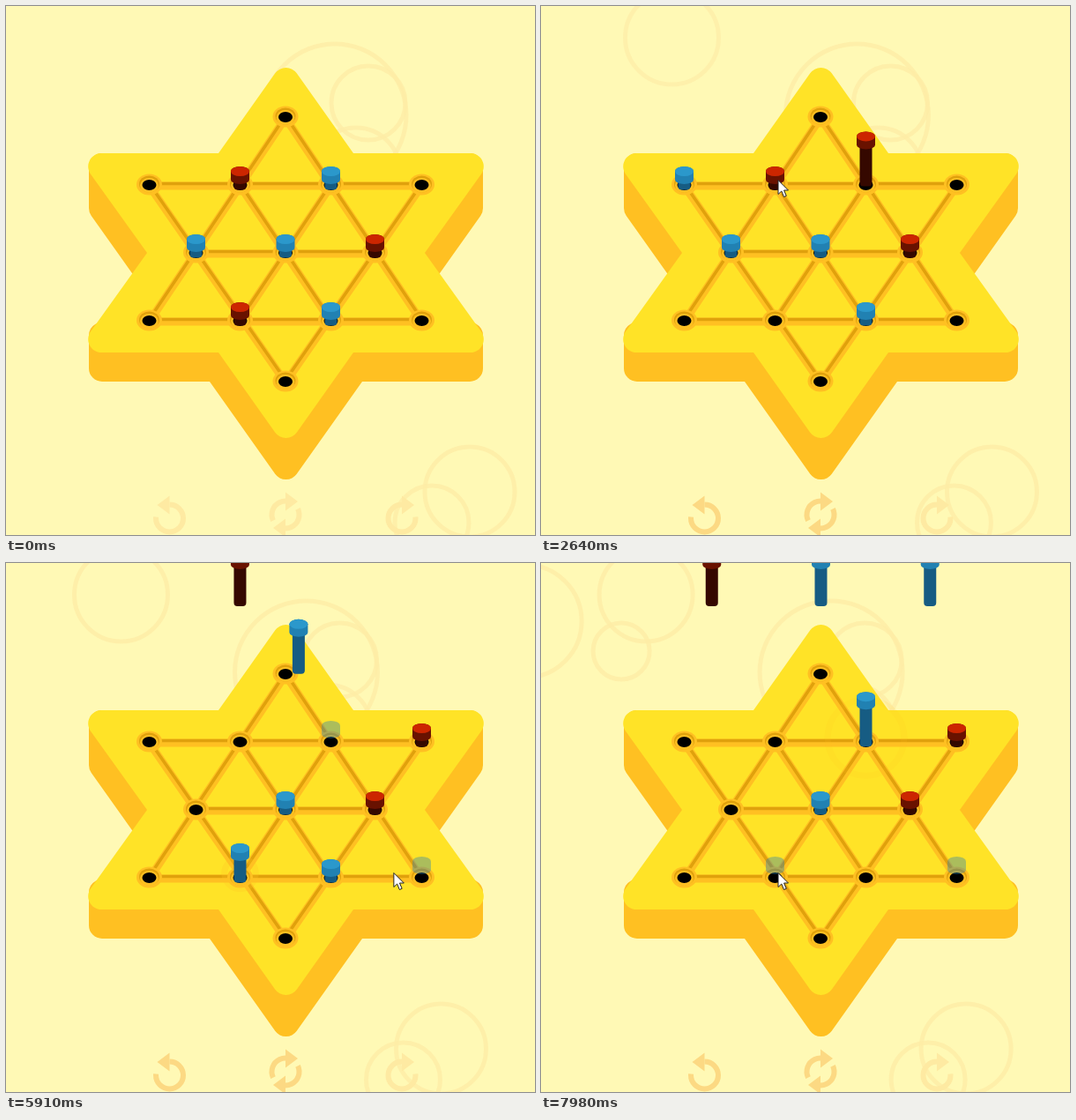
An HTML page with a canvas for the animation above (8 s loop, 600 by 600 pixels).

```html
<!DOCTYPE html>
<html lang="en">
<head>
<meta charset="utf-8">
<title>Star peg puzzle</title>
<style>
html, body { margin: 0; height: 100%; overflow: hidden; background: #fff9b5; }
canvas { display: block; width: 100vw; height: 100vh; }
</style>
</head>
<body>
<canvas id="stage" width="600" height="600"></canvas>
<script>
const ctx = document.getElementById('stage').getContext('2d');
const LOOP = 8000, RISE = 220, FLIGHT = 385, TRAVEL = 160, CLICK_LEAD = 150;
const LIFT = 64, HOLD = 18, STEM = 62;
const TO_TOP = RISE * (1 - HOLD / LIFT);
const CENTER_X = 317, CENTER_Y = 280;
const PAPER = '#fff9b5', BOARD = '#ffe327', ORANGE = '#ffc022', GROOVE = '#e0a10c';

const clamp = v => Math.max(0, Math.min(1, v));
const lerp = (a, b, k) => a + (b - a) * k;
const smooth = k => k * k * (3 - 2 * k);

// Holes are named by row letter and place in the row.
const holes = {};
for (const [row, count, y] of [['A', 1, 126], ['B', 4, 203], ['C', 3, 280], ['D', 4, 357], ['E', 1, 426]]) {
  for (let i = 0; i < count; i++) {
    const spacing = 97 + 1.5 * count;
    holes[row + (i + 1)] = [CENTER_X + spacing * (i - (count - 1) / 2), y];
  }
}
const grooves = ['B1 B4', 'C1 C3', 'D1 D4', 'A1 D1', 'A1 D4', 'E1 B1', 'E1 B4', 'B2 D3', 'B3 D2']
  .map(pair => pair.split(' ').map(name => holes[name]));

const colors = {
  red: { top: '#cc2600', side: '#691200', stem: '#350800' },
  blue: { top: '#2b98cb', side: '#2181b2', stem: '#165c83' }
};
const pegs = { B2: 'red', B3: 'blue', C1: 'blue', C2: 'blue', C3: 'red', D2: 'red', D3: 'blue' };

// Pegs are known by their first hole; each is chosen at `select` and leaves at `go`.
const moves = [
  { peg: 'B3', from: 'B3', to: 'B1', select: 600, go: 1146, hints: 'B1 D4' },
  { peg: 'D2', from: 'D2', to: 'B3', select: 1700, go: 2014, hints: 'B3 D4' },
  { peg: 'B2', from: 'B2', to: 'B4', select: 2750, go: 3492, hints: 'B4 D1', eats: 'D2' },
  { peg: 'B3', from: 'B1', to: 'D2', select: 4300, go: 4685, hints: 'D2', eats: 'C1' },
  { peg: 'B3', from: 'D2', to: 'D4', select: 5793, go: 6477, hints: 'B3 D4', eats: 'D3' },
  { peg: 'B3', from: 'D4', to: 'B3', select: 7100, go: 7341, hints: 'B3' },
  { peg: 'B3', from: 'B3', to: 'D2', select: 7600, go: Infinity, hints: 'D2 D4' }
];
const captures = moves.filter(m => m.eats)
  .map(m => ({ peg: m.eats, start: m.go + TO_TOP + FLIGHT + RISE }));
const clicks = moves.flatMap(m => [[m.select, m.from], [m.go - CLICK_LEAD, m.to]]);
const HOVER = [6900, 'B3'], ENTER = [150, 'C2'];
const stops = [ENTER, ...clicks, HOVER].sort((a, b) => (a[0] < b[0] ? -1 : 1));

function ellipse(x, y, rx, ry, fill) {
  ctx.fillStyle = fill;
  ctx.beginPath();
  ctx.ellipse(x, y, rx, ry, 0, 0, Math.PI * 2);
  ctx.fill();
}

function ring(x, y, r, width, color) {
  ctx.strokeStyle = color;
  ctx.lineWidth = width;
  ctx.beginPath();
  ctx.arc(x, y, r, 0, Math.PI * 2);
  ctx.stroke();
}

// Fills a clockwise polygon around the board centre, rounding its outward corners.
function roundedShape(points, fill) {
  const n = points.length;
  ctx.save();
  ctx.translate(CENTER_X + 0.5, CENTER_Y);
  ctx.beginPath();
  points.forEach((p, i) => {
    const a = points[(i + n - 1) % n], b = points[(i + 1) % n];
    const turn = (p[0] - a[0]) * (b[1] - p[1]) - (p[1] - a[1]) * (b[0] - p[0]);
    if (!i) ctx.moveTo((a[0] + p[0]) / 2, (a[1] + p[1]) / 2);
    ctx.arcTo(...p, ...b, turn > 0 ? 15 : 0);
  });
  ctx.fillStyle = fill;
  ctx.fill();
  ctx.restore();
}

const mirrorX = points => [...points, ...points.map(([x, y]) => [-x, y]).reverse()];
const mirrorY = points => [...points, ...points.map(([x, y]) => [x, -y]).reverse()];
const halfStar = mirrorY([[0, -221], [76.5, -113], [238.5, -113], [157.5, 0]]);
const unique = points => points.filter((p, i) => {
  const q = points[(i + 1) % points.length];
  return p[0] !== q[0] || p[1] !== q[1] && true;
});
const sameSpot = (p, q) => Math.abs(p[0] - q[0]) + Math.abs(p[1] - q[1]) === 0;
const distinct = points => points.filter((p, i) => !sameSpot(p, points[(i + 1) % points.length]));
const topFace = distinct(mirrorX(halfStar));
const sideFace = distinct(mirrorX(
  [[223.5, -113], [223.5, -46], [157.5, 47], [223.5, 85], [223.5, 146], [86.5, 146], [0, 268]]));

function drawBackground(t) {
  ctx.fillStyle = PAPER;
  ctx.fillRect(0, 0, 600, 600);
  const bubble = (x, y, r, born = -1000) => {
    ctx.globalAlpha = 0.75 * clamp((t - born) / 900);
    ring(x - 0.0055 * t, y, r, 5, '#feeca6');
  };
  bubble(373, 124, 81);
  bubble(411, 110, 42);
  bubble(397, 188, 50);
  bubble(526, 551, 51);
  bubble(483, 586, 42);
  bubble(163, 36, 53, 1900);
  bubble(26, 66, 64, 6700);
  bubble(135, 100, 32, 6700);
  ctx.globalAlpha = 1;
}

function drawBoard() {
  roundedShape(sideFace, ORANGE);
  roundedShape(topFace, BOARD);
  for (const [color, width, dy] of [[ORANGE, 9, 1], [GROOVE, 3.5, -1.5]]) {
    ctx.strokeStyle = color;
    ctx.lineWidth = width;
    ctx.beginPath();
    for (const [a, b] of grooves) {
      ctx.moveTo(a[0], a[1] + dy);
      ctx.lineTo(b[0], b[1] + dy);
    }
    ctx.stroke();
  }
  for (const [x, y] of Object.values(holes)) {
    ellipse(x, y - 0.5, 14.5, 12, ORANGE);
    ellipse(x, y - 1, 11.5, 9.5, GROOVE);
    ellipse(x, y + 0.5, 10.5, 8.5, ORANGE);
    ellipse(x, y, 8, 6, '#000');
  }
}

// An arc from `start` to the top of the circle, ending in an arrowhead.
function arrowArc(x, y, { scale = 1, rotate = 0, start, end, head, color }) {
  ctx.save();
  ctx.translate(x, y);
  ctx.rotate(rotate);
  ctx.scale(scale, 1);
  ctx.strokeStyle = ctx.fillStyle = color;
  ctx.lineWidth = 6;
  ctx.beginPath();
  ctx.arc(0, 0, 15.5, start, end);
  ctx.stroke();
  ctx.beginPath();
  ctx.moveTo(0, -25.5);
  ctx.lineTo(head, -15);
  ctx.lineTo(0, -4.5);
  ctx.fill();
  ctx.restore();
}

function drawButtons(t) {
  const top = Math.PI * 1.5, idle = '#feeaa2';
  const active = t >= moves[0].go - CLICK_LEAD ? '#fcd983' : idle;
  const turn = { start: -Math.PI / 2, end: Math.PI * 1.03, head: -14 };
  arrowArc(185.5, 581, { ...turn, color: active });
  arrowArc(449, 581, { ...turn, color: idle, scale: -1 });
  for (const rotate of [0, Math.PI]) {
    arrowArc(317, 577, { start: Math.PI * 0.86, end: top, head: 14, rotate, color: active });
  }
}

function headOutline(x, top) {
  ctx.beginPath();
  ctx.ellipse(x, top + 5.5, 10.5, 5.5, 0, Math.PI, 0);
  ctx.ellipse(x, top + 15, 10.5, 5, 0, 0, Math.PI);
  ctx.closePath();
}

function drawPeg({ x, top, floor, color }) {
  const bottom = Math.min(top + STEM, floor);
  ctx.fillStyle = color.stem;
  ctx.beginPath();
  ctx.roundRect(x - 7, top + 12, 14, bottom - top - 12, [0, 0, 4, 4]);
  ctx.fill();
  headOutline(x, top);
  ctx.fillStyle = color.side;
  ctx.fill();
  ellipse(x, top + 5.5, 10.5, 5.5, color.top);
}

function pegState(home, t) {
  let [x, y] = holes[home], lift = 0, flying = false;
  for (const m of moves) {
    if (m.peg !== home || t < m.select) continue;
    lift = Math.max(lift, Math.min(HOLD, (t - m.select) * LIFT / RISE));
    if (t < m.go) continue;
    const takeoff = m.go + TO_TOP, landing = takeoff + FLIGHT;
    const k = clamp((t - takeoff) / FLIGHT);
    x = lerp(holes[m.from][0], holes[m.to][0], k);
    y = lerp(holes[m.from][1], holes[m.to][1], k);
    flying = k > 0 && k < 1;
    if (t < takeoff) lift = lerp(HOLD, LIFT, (t - m.go) / TO_TOP);
    else lift = LIFT * (1 - clamp((t - landing) / RISE)) + 30 * Math.sin(Math.PI * k);
  }
  let top = y - 21 - lift;
  const slot = captures.findIndex(c => c.peg === home);
  if (slot >= 0 && t >= captures[slot].start) {
    top -= LIFT * clamp((t - captures[slot].start) / RISE);
    // Every later capture spreads the row of taken pegs again.
    for (let j = slot; j < captures.length; j++) {
      const k = clamp((t - captures[j].start - RISE) / FLIGHT);
      x = lerp(x, 70 + 495 * (slot + 1) / (j + 2), k);
      if (j === slot) {
        top = lerp(top, -13, k);
        flying = k > 0;
      }
    }
  }
  return { x, top, flying, floor: flying ? 1000 : y + 5.5, color: colors[pegs[home]] };
}

function drawHints(t) {
  ctx.globalAlpha = 0.38;
  for (const m of moves) {
    if (t < m.select || t >= m.go - CLICK_LEAD) continue;
    ctx.fillStyle = colors[pegs[m.peg]].side;
    for (const name of m.hints.split(' ')) {
      headOutline(holes[name][0], holes[name][1] - 24);
      ctx.fill();
    }
  }
  ctx.globalAlpha = 1;
}

function drawRipples(t) {
  for (const [start, name] of clicks) {
    const p = (t - start) / 600;
    if (!(p > 0 && p < 1)) continue;
    ctx.globalAlpha = 0.3 * (1 - p);
    ring(holes[name][0], holes[name][1] - 5, 50 * (1 - (1 - p) ** 2), 7, ORANGE);
  }
  ctx.globalAlpha = 1;
}

// The pointer leaves each stop at its time and hurries to the next one.
function drawCursor(t) {
  const i = stops.findLastIndex(stop => stop[0] <= t);
  if (i < 0) return;
  const a = holes[stops[i][1]], b = holes[stops[i + 1][1]];
  const k = smooth(clamp((t - stops[i][0]) / TRAVEL));
  ctx.save();
  ctx.translate(lerp(a[0], b[0], k) + 3, lerp(a[1], b[1], k) - 6);
  const outline = new Path2D('M.5 .5V16.5L4.3 13L7 19.5L9.8 18.3L7.1 12H12Z');
  ctx.fillStyle = '#fff';
  ctx.strokeStyle = '#222';
  ctx.lineWidth = 1;
  ctx.fill(outline);
  ctx.stroke(outline);
  ctx.restore();
}

function frame() {
  const t = performance.now() % LOOP;
  drawBackground(t);
  drawButtons(t);
  drawBoard();
  drawRipples(t);
  drawHints(t);
  Object.keys(pegs).map(home => pegState(home, t))
    .sort((a, b) => a.floor - b.floor)
    .forEach(drawPeg);
  drawCursor(t);
  requestAnimationFrame(frame);
}
frame();
</script>
</body>
</html>
```
